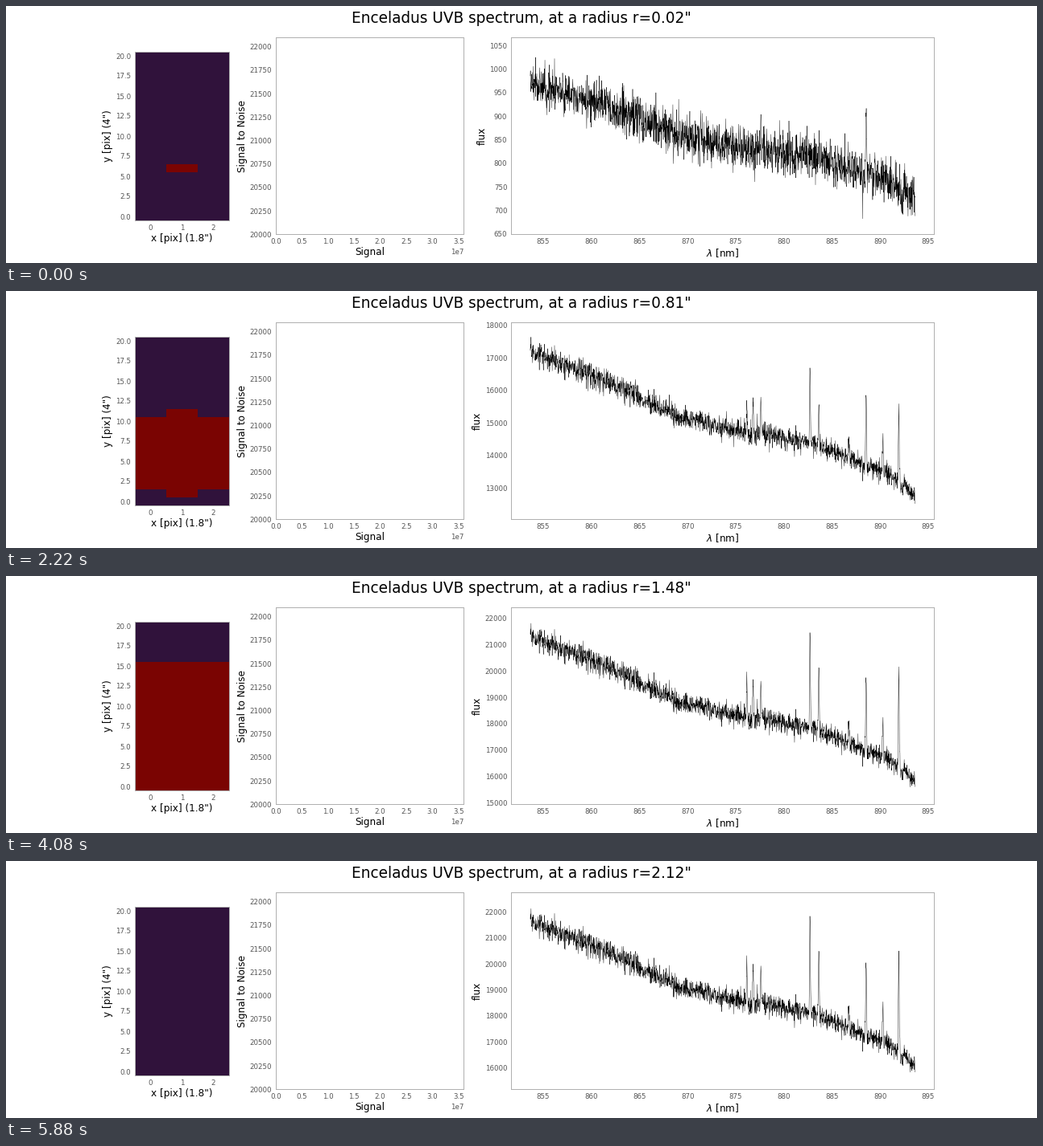
A matplotlib script for the animation above (5.94 s loop, 1280 by 320 pixels).

```python
import matplotlib.pyplot as plt
import numpy as np
from matplotlib.animation import FuncAnimation

W, H, DPI = 1280, 320, 100
FRAMES, INTERVAL = 99, 60
PX = 72 / DPI  # points per pixel
GREY, EDGE = "#555555", "#b0b0b0"

plt.rcParams["font.family"] = "DejaVu Sans"

# Slit geometry in arcseconds, centred on the brightest pixel
ROWS, COLS, ROW0, COL0 = 21, 3, 6, 1
dy = (np.arange(ROWS) - ROW0)[:, None]
dx = (np.arange(COLS) - COL0)[None, :]
distance = np.hypot(dx * 1.8 / 4, dy * 4 / 27)

# A bright central column between two fainter, slightly broader ones
glow = np.where(dx == 0, np.exp(-(dy / 5.6) ** 2),
                .603 * np.exp(-(dy / 6.5) ** 2))
light = glow / glow.sum()

# Smooth spectrum of the whole slit, plus texture common to all pixels
rng = np.random.default_rng(12)
wave = np.linspace(853.65, 893.63, 2000)
continuum = np.interp(wave, [853.6, 862, 869, 875, 883, 891, 893.6],
                      [21650, 20450, 19130, 18600, 18100, 16870, 16100])
continuum *= 1 + .0095 * rng.normal(size=wave.size)
noise = rng.normal(size=(ROWS, COLS, wave.size)) * 22 * np.sqrt(glow)[..., None]

# Wavelength, full height, share of the light at which the line appears
LINES = [(876.15, 1350, .6), (876.8, 1300, .3), (877.62, 1400, 0),
         (882.72, 3650, .45), (883.63, 2400, .6), (886.75, 850, .3),
         (888.55, 2850, 0), (890.3, 1350, .2), (891.95, 3600, .45)]


def spectrum(mask):
    share = light[mask].sum()
    flux = share * continuum + noise[mask].sum(axis=0)
    for centre, height, onset in LINES:
        growth = max(0, (share - onset) / (1 - onset))
        flux += height * growth * np.exp(-((wave - centre) / .045) ** 2 / 2)
    low, high = 15200 * share - 35, 22720 * share + 45
    margin = (high - low) / 22
    return np.clip(flux, low + margin, high - margin), (low, high)


fig = plt.figure(figsize=(W / DPI, H / DPI), dpi=DPI, facecolor="white")
title = fig.text(.5, 1 - 21 / H, "", ha="center", va="baseline",
                 fontsize=18.56 * PX)


def add_panel(left, top, right, bottom, xlabel, ylabel):
    ax = fig.add_axes([left / W, 1 - bottom / H,
                       (right - left) / W, (bottom - top) / H])
    ax.tick_params(length=0, pad=4.67 * PX, labelsize=8.6 * PX,
                   labelcolor=GREY)
    for spine in ax.spines.values():
        spine.set(color=EDGE, linewidth=PX)
    for axis, text, pad in ((ax.xaxis, xlabel, 2.4), (ax.yaxis, ylabel, 3)):
        axis.set_label_text(text, fontsize=12 * PX)
        axis.labelpad = pad * PX
        axis.get_offset_text().set(color=GREY, fontsize=8.6 * PX)
    return ax


slit_ax = add_panel(160, 57, 277, 267, 'x [pix] (1.8")', 'y [pix] (4")')
image = slit_ax.imshow(np.zeros((ROWS, COLS)), cmap="turbo", origin="lower",
                       aspect="auto", interpolation="nearest")

ratio_ax = add_panel(335, 39, 568.4, 284.4, "Signal", "Signal to Noise")
ratio_ax.set(xlim=(0, 3.6e7), ylim=(20000, 22100))

flux_ax = add_panel(627, 39, 1152.4, 284.4, r"$\lambda$ [nm]", "flux")
flux_ax.set_xlim(851.65, 895.63)
curve, = flux_ax.plot([], [], color="black", linewidth=.3)


def update(frame):
    radius = distance.max() * (frame + 1) / FRAMES
    mask = distance <= radius + 1e-9
    image.set_data(mask.astype(float))
    image.set_clim(mask.min(), mask.max())
    flux, limits = spectrum(mask)
    curve.set_data(wave, flux)
    flux_ax.set_ylim(limits)
    title.set_text(f'Enceladus UVB spectrum, at a radius r={round(radius, 2)}"')


anim = FuncAnimation(fig, update, frames=FRAMES, interval=INTERVAL,
                     init_func=lambda: None, repeat=True, repeat_delay=0)
plt.show()
```
